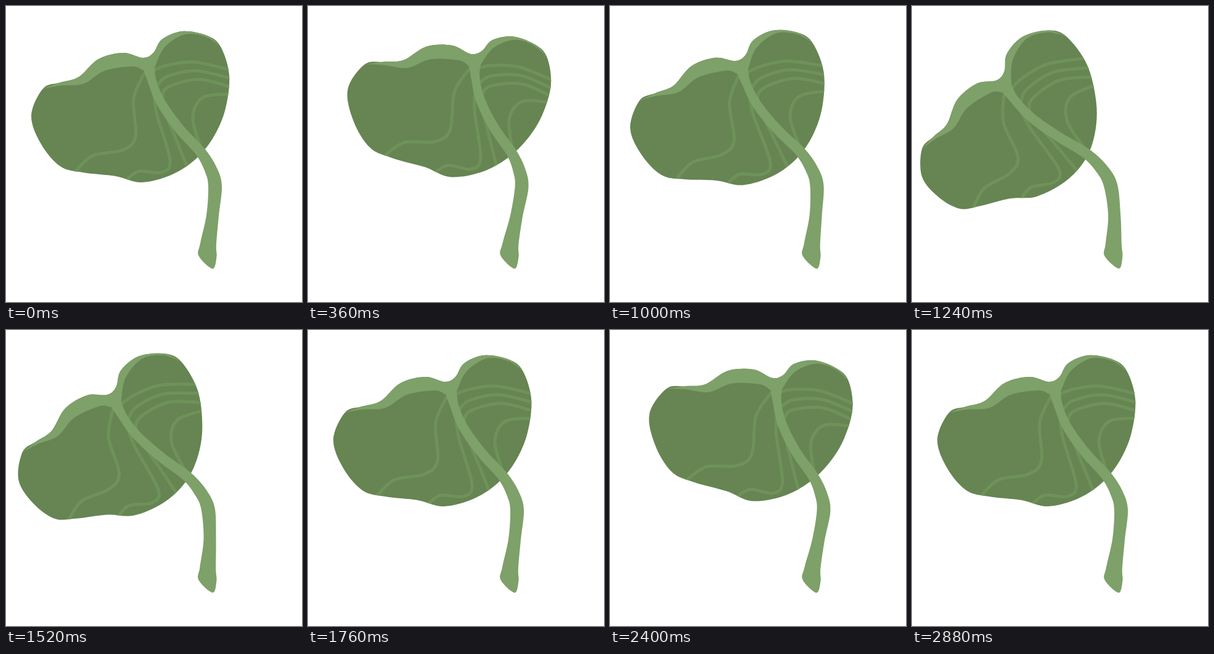
An HTML page that plays this animation: 480x480 px, repeating every 2.92 s.

```html
<!DOCTYPE html>
<html lang="en">
<head>
<meta charset="utf-8">
<title>Swaying leaf</title>
<style>
  html, body { margin: 0; width: 100%; height: 100%; overflow: hidden; background: #fff; }
  svg { display: block; width: 100vw; height: 100vh; }
</style>
</head>
<body>
<svg viewBox="0 0 480 480">
  <clipPath id="leafClip"><path id="clip"/></clipPath>
  <path id="leaf" fill="#668552"/>
  <g id="veins" clip-path="url(#leafClip)" fill="none" stroke="#6e9259" stroke-width="5"></g>
  <path id="rim" fill="#7ea069"/>
  <path id="stem" fill="#7ea069"/>
</svg>
<script>
const LOOP = 2920, STEP = 40;
const FOOT = { x: 327, y: 412 };

// Key points of the resting pose; smooth curves run through them.
const topEdge = [[60, 134], [88, 124], [118, 115], [150, 86], [190, 76], [222, 84],
  [239, 76], [253, 54], [286, 41], [326, 48], [348, 66]];
const lowEdge = [[362, 112], [356, 166], [338, 210], [310, 246], [270, 273], [220, 286],
  [178, 276], [125, 270], [88, 260], [57, 224], [41, 178]];
const innerRight = [[348, 66], [324, 50], [290, 46], [257, 67], [241, 100]];
const innerLeft = [[222, 104], [205, 98], [160, 105], [126, 126], [88, 129], [60, 134]];

const arches = [0, 1, 2].map(i =>
  [[240 + 6 * i, 104 + 24 * i], [262, 96 + 18 * i], [305 + 4 * i, 91 + 14 * i], [366, 104 + 14 * i]]);
const veins = [
  ...arches,
  [[225, 108], [207, 150], [210, 212], [188, 234], [140, 243], [110, 271]],
  [[239, 128], [244, 173], [266, 250], [252, 270], [215, 268], [193, 284]],
  [[244, 140], [265, 190], [296, 266]],
  [[315, 228], [303, 180], [320, 148], [366, 143]]
];

// Centre line of the stem with its width at each point.
const stemLine = [[230, 90, 18], [237, 122, 14], [252, 158, 15], [282, 200, 16], [315, 236, 17],
  [332, 265, 20], [339, 292, 22], [335, 340, 20], [328, 386, 26], [327, 406, 29]];
const stemTip = [335, 426];

function ribbon(line, tip) {
  const side = sign => line.map(([x, y, w], i) => {
    const a = line[Math.max(0, i - 1)], b = line[Math.min(line.length - 1, i + 1)];
    const dx = b[0] - a[0], dy = b[1] - a[1], k = sign * w / 2 / Math.hypot(dx, dy);
    return [x + dy * k, y - dx * k];
  });
  return [...side(-1), tip, ...side(1).reverse()];
}
const stem = ribbon(stemLine, stemTip);

// Eased swings between [time, sway] rest points.
const swings = [[0, 0], [680, 1.07], [1268, -1.29], [2120, 0.81], [2900, 0], [LOOP, 0]];

function swayAt(t) {
  const i = swings.findIndex(([time]) => time > t);
  const [t0, a] = swings[i - 1], [t1, b] = swings[i];
  const u = (t - t0) / (t1 - t0);
  return a + (b - a) * u * u * (3 - 2 * u);
}

// Turns a point around the foot; the turn grows with distance and levels off.
function bend([px, py], sway) {
  const x = px - FOOT.x, h = FOOT.y - py;
  const reach = 1 - Math.exp(-Math.hypot(x, h) / 230);
  const turn = sway * reach * 15.5 * Math.PI / 180;
  const scale = Math.exp(-reach * (sway * (0.00042 * x + 0.0002 * h) + 0.009 * sway * sway));
  const c = Math.cos(turn) * scale, s = Math.sin(turn) * scale;
  return [FOOT.x + x * c + h * s, FOOT.y - h * c + x * s];
}

// Catmull-Rom curve through the points, as Bezier segments.
function curve(points, closed = false, start = "M") {
  const n = points.length;
  const at = i => points[closed ? (i + n) % n : Math.max(0, Math.min(n - 1, i))];
  const fmt = p => p.map(v => v.toFixed(2)).join(" ");
  let d = start + fmt(points[0]);
  for (let i = 0; i < (closed ? n : n - 1); i++) {
    const [a, b, c, e] = [at(i - 1), at(i), at(i + 1), at(i + 2)];
    const out = b.map((v, k) => v + (c[k] - a[k]) / 6);
    const into = c.map((v, k) => v - (e[k] - b[k]) / 6);
    d += "C" + [out, into, c].map(fmt).join(" ");
  }
  return closed ? d + "Z" : d;
}

const el = id => document.getElementById(id);
const setPath = (node, d) => node.setAttribute("d", d);
const veinNodes = veins.map(() =>
  el("veins").appendChild(document.createElementNS("http://www.w3.org/2000/svg", "path")));

function draw(t) {
  const sway = swayAt(t);
  const pose = points => points.map(p => bend(p, sway));
  const outline = curve(pose([...topEdge, ...lowEdge]), true);
  setPath(el("leaf"), outline);
  setPath(el("clip"), outline);
  setPath(el("rim"), curve(pose(topEdge)) + curve(pose(innerRight), false, "L")
    + curve(pose(innerLeft), false, "L") + "Z");
  setPath(el("stem"), curve(pose(stem), true));
  veins.forEach((v, i) => setPath(veinNodes[i], curve(pose(v))));
}

const begin = performance.now();
function tick() {
  const t = (performance.now() - begin) % LOOP;
  draw(Math.floor(t / STEP) * STEP);
  requestAnimationFrame(tick);
}
tick();
</script>
</body>
</html>
```
